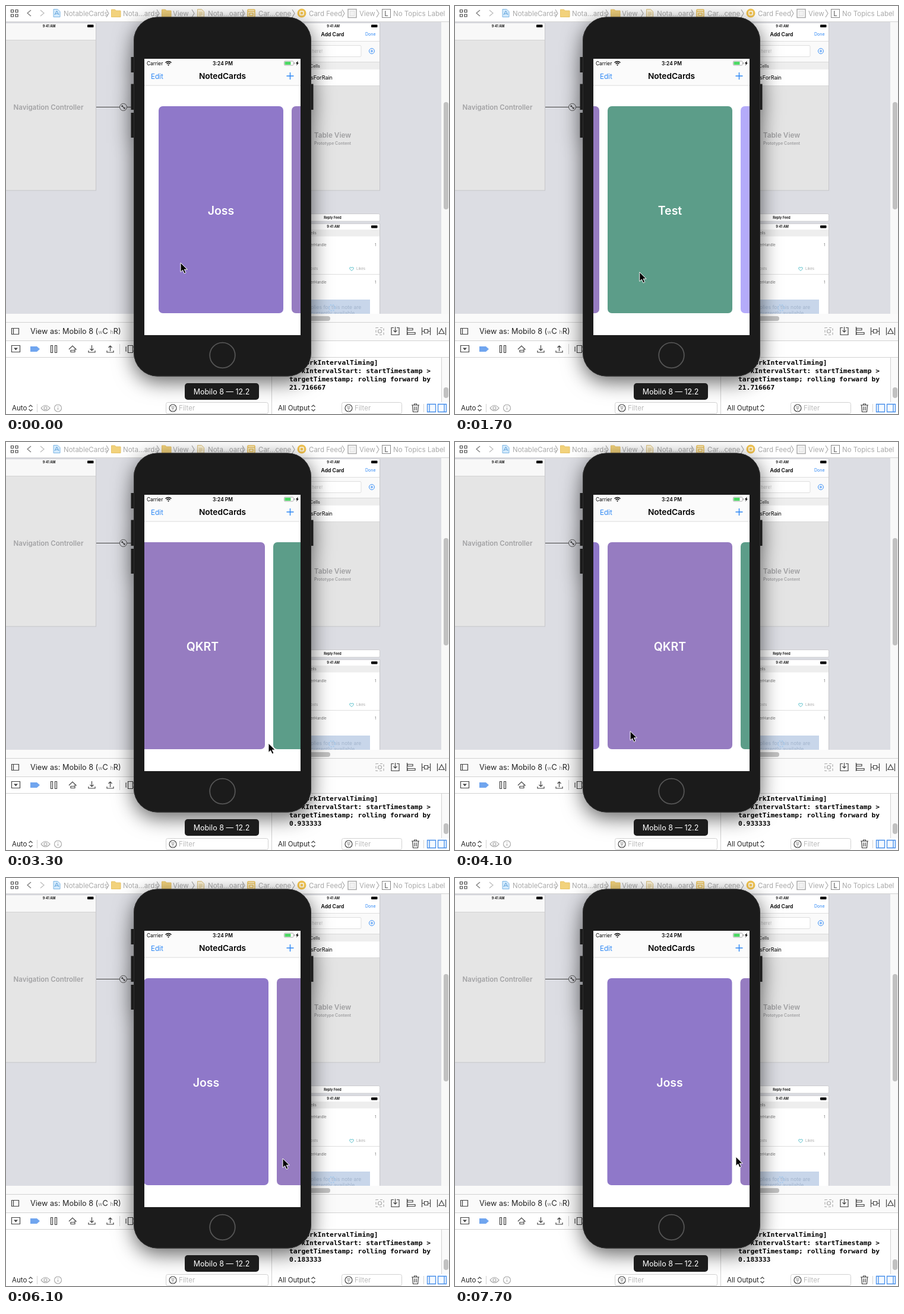
These frames come from a looping animation (746x688 px, 7800 ms). An HTML page:

```html
<!DOCTYPE html>
<html lang="en">
<head>
<meta charset="utf-8">
<title>Card carousel</title>
<style>
html, body { margin: 0; width: 100%; height: 100%; overflow: hidden; background: #fff; }
svg { display: block; font-family: Inter, Roboto, sans-serif; }
text { white-space: pre; }
.b { font-weight: 600; }
.m { text-anchor: middle; }
.line { fill: none; stroke: #444; stroke-width: 1.2; }
.dim { stroke: #aaa; }
.rule { fill: none; stroke: #d2d2d2; }
.tiny { font-size: 5.5px; }
.blue { fill: #2b86f5; }
.log { font: bold 11.3px "DejaVu Sans Mono", "Liberation Mono", monospace; }
.body { filter: drop-shadow(0 9px 17px rgba(0,0,0,.62)); }
</style>
</head>
<body>
<svg width="746" height="688" viewBox="0 0 746 688">
<defs>
  <clipPath id="screen"><rect x="233" y="135" width="263" height="420"/></clipPath>
  <clipPath id="console"><rect x="448" y="594" width="286" height="74"/></clipPath>
  <clipPath id="canvas"><rect y="27" width="733" height="492"/></clipPath>
</defs>
<rect width="746" height="688" fill="#fff"/>

<!-- Storyboard canvas -->
<rect y="27" width="733" height="492" fill="#dcdde3"/>
<rect x="733" y="27" width="13" height="506" fill="#f8f8f8"/>
<rect y="519" width="746" height="14" fill="#fafafa"/>
<rect x="737" y="162" width="8" height="181" rx="4" fill="#c1c1c1"/>
<rect x="300" y="523" width="246" height="8" rx="4" fill="#c1c1c1"/>
<g clip-path="url(#canvas)">
  <rect x="-1" y="29" width="152.500" height="282" fill="#e5e5e5" stroke="#c6c6c9"/>
  <rect y="29" width="151" height="28" fill="#f8f8f8"/>
  <path class="rule" d="M0 57.500H151"/>
  <text class="b m tiny" x="72.500" y="36">9:41 AM</text>
  <rect x="137" y="31.500" width="10.500" height="4.500" rx="1"/>
  <text class="b m" x="71.500" y="175" font-size="11.500" fill="#a3a3a5">Navigation Controller</text>
  <path class="line" d="M152 170.500H212"/>
  <circle cx="197.500" cy="170.500" r="6" fill="#dcdde3" stroke="#555"/>
  <path class="line" d="M195 168l5 5M195 170v-2h2M200 171v2h-2" stroke-width=".8"/>

  <rect x="480" y="29" width="149.500" height="282" fill="#e4e4e4" stroke="#c6c6c9"/>
  <rect x="480" y="29" width="149" height="31" fill="#fff"/>
  <rect x="480" y="60" width="149" height="34" fill="#fafafa"/>
  <rect x="480" y="94" width="149" height="13" fill="#eee"/>
  <rect x="480" y="107" width="149" height="27" fill="#fff"/>
  <path class="rule" d="M480 59.500H629M480 94.500H629M480 134.500H629" stroke-width=".7"/>
  <text class="b m tiny" x="551" y="36">9:41 AM</text>
  <rect x="615" y="31.500" width="10.500" height="4.500" rx="1"/>
  <text class="b m" x="550" y="50.500" font-size="8.600">Add Card</text>
  <text class="blue" x="605" y="50" font-size="7">Done</text>
  <rect x="480" y="66.500" width="118" height="19" rx="2" fill="#fff" stroke="#dedede"/>
  <text x="515" y="79" font-size="7.500" fill="#c4c4c4">here!</text>
  <g fill="none" stroke="#2b86f5" stroke-width=".9"><circle cx="616" cy="76" r="4.500"/><path d="M613.500 76h5M616 73.500v5"/></g>
  <text class="b" x="512" y="103.500" font-size="7" fill="#555">Cells</text>
  <text x="513" y="124" font-size="9">sForRain</text>
  <text class="b m" x="550" y="221.500" font-size="11.800" fill="#a0a0a2">Table View</text>
  <text class="b m" x="550" y="234" font-size="7" fill="#a0a0a2">Prototype Content</text>

  <rect x="480" y="350.500" width="149.500" height="12.500" rx="2" fill="#fff" stroke="#cdcdd0"/>
  <text class="b m tiny" x="550" y="359">Reply Feed</text>
  <rect x="480" y="367" width="149.500" height="160" fill="#fff" stroke="#c6c6c9"/>
  <text class="b m tiny" x="551" y="374">9:41 AM</text>
  <rect x="615" y="370" width="10.500" height="4.500" rx="1"/>
  <rect x="480" y="377" width="149" height="11.500" fill="#eee"/>
  <g font-size="6.200" fill="#777">
    <text x="513" y="385">ells</text>
    <text x="513" y="405">erHandle</text><text x="621" y="405">1</text>
    <text x="513" y="445" fill="#aaa">osts</text><text x="590" y="445" fill="#aaa">Likes</text>
    <text x="513" y="468">erHandle</text><text x="621" y="468">1</text>
  </g>
  <path d="M582 446.500l-3-3q-1-3 1.500-3 1 0 1.500 1.300 .5-1.300 1.500-1.300 2.500 0 1.500 3z" fill="none" stroke="#56bfca"/>
  <path class="rule" d="M480 452.500H629" stroke-width=".7"/>
  <rect x="480" y="495" width="133" height="24" fill="#c8d6ea"/>
  <g font-size="8.600" fill="#a2b4cc"><text x="513" y="510.500">plies for this note are</text><text x="513" y="521">currently available</text></g>
  <circle cx="549" cy="509" r="5" fill="none" stroke="#a9cbed" stroke-width="2" stroke-dasharray="2 2"/>
</g>

<!-- Path bar -->
<path class="rule" d="M0 26.500H746"/>
<g class="line" stroke="#666"><path d="M8.500 6.500h4v4h-4zM16 6.500h4v4h-4zM8.500 14h4v4h-4zM16 14h4v4h-4z"/><path d="M42 7l-6 5 6 5" stroke="#777"/><path d="M58 7l6 5-6 5" stroke="#bbb"/></g>
<g id="crumbs" font-size="11.500" fill="#aaa"></g>
<path d="M80 5.500h7l4 4v9h-11z" fill="#d3eafc" stroke="#7db6e5"/><path d="M82 15l3.500-7 3.500 7M83 13h5" fill="none" stroke="#5c9fd8"/>
<path id="folder" d="M177.500 6h6l1.500 2h8v10.500h-15.500z" fill="#f2d27c" stroke="#e8c365"/><use href="#folder" x="85"/>
<path d="M322.500 5.500h7l4 4v9h-11z" fill="#fcf2d5" stroke="#dcc383"/><path d="M325 11h6M325 13.500h6M325 16h4" stroke="#dcc383"/>
<rect x="407" y="6" width="12" height="12.500" rx="1" fill="#fff6da" stroke="#ebc157" stroke-width="1.500"/><path d="M407 9h12M410 12h6v4h-6z" fill="none" stroke="#ebc157" stroke-width="1.500"/>
<circle cx="498" cy="12" r="7.500" fill="#f2c452"/><rect x="495" y="9" width="6" height="6" rx="1" fill="none" stroke="#fff" stroke-width="1.500"/>
<rect x="576" y="5.500" width="14" height="14" fill="#fff" stroke="#aaa" stroke-width="1.500"/><rect x="579" y="8.500" width="8" height="8" fill="#f2f2f2" stroke="#ddd"/>
<rect x="633.500" y="5.500" width="14" height="14" fill="#fff" stroke="#888"/><text class="m" x="640.500" y="17" font-size="11.500" fill="#555">L</text>

<!-- Device bar -->
<rect y="533" width="746" height="31" fill="#fafafa"/>
<path class="rule" d="M0 533.500H746M0 564.500H746"/>
<path class="line" d="M9.500 543.500h12v10h-12zM12.500 543.500v10"/>
<text x="41" y="552.500" font-size="12.700" fill="#222">View as: Mobilo 8 (<tspan font-size="9" fill="#888">w</tspan>C <tspan font-size="9" fill="#888">h</tspan>R)</text>
<g class="line">
  <path class="dim" d="M623 542.500h13v12h-13z" stroke-dasharray="4 3"/><circle class="dim" cx="629.500" cy="548.500" r="3"/>
  <path d="M653 542.500h-4v12h13v-12h-4M655.500 541v9m-3-3l3 3 3-3"/>
  <path d="M675.500 541v14M676 543.500h9v3h-9zM676 550.500h13v3h-13z"/>
  <path d="M700.500 542v13M714.500 542v13M704.500 545.500h6v6h-6zM701 548.500h3M711 548.500h3"/>
  <path d="M726.500 542v13M740.500 542v13M733.500 544l4.500 8.500h-9z"/>
</g>

<!-- Debug bar -->
<path class="rule" d="M0 592.500H746"/>
<path class="line" d="M9.500 572.500h14v11h-14z"/><path d="M13 576.500h7l-3.500 4z" fill="#444"/>
<path d="M41 574h11l5 4.500-5 4.500h-11z" fill="#70a5ef"/>
<path class="line" d="M75.500 572.500h3v12h-3zM82.500 572.500h3v12h-3z"/>
<g class="line" stroke="#999">
  <path d="M106 579l6-6 6 6h-3M109 583.500h7v-3h-7z"/>
  <path d="M144.500 572v9m-3-3l3 3 3-3M139 581v3h11v-3"/>
  <path d="M175.500 582v-9m-3 3l3-3 3 3M170 581v3h11v-3"/>
</g>
<path class="rule" d="M191.500 570v17"/>
<path class="line" d="M205.500 572.500h8v12h-8zM203 575h-1v7h1M214 575h3v7h-3"/>

<!-- Debug area -->
<path class="rule" d="M447.500 593V688"/>
<rect x="734" y="593" width="12" height="75" fill="#fafafa"/><path class="rule" d="M733.500 593V668"/>
<rect x="737" y="643" width="8" height="18" rx="4" fill="#c1c1c1"/>
<g class="log" clip-path="url(#console)">
  <text x="477" y="605">NetworkIntervalTiming]</text>
  <text x="477" y="619">WorkIntervalStart: startTimestamp &gt;</text>
  <text x="477" y="633">targetTimestamp; rolling forward by</text>
  <text x="477" y="647" id="delay"></text>
</g>
<g font-size="11.500" fill="#222"><text x="10" y="682">Auto</text><text x="458" y="682">All Output</text></g>
<path id="updown" class="line" d="M38.500 676l3-3 3 3M38.500 680l3 3 3-3"/><use href="#updown" x="476"/>
<path class="rule" d="M52.500 671v14M703.500 671v14"/>
<g class="line dim"><path d="M59 678q7.500-9 15 0q-7.500 9-15 0"/><circle cx="66.500" cy="678" r="2.500"/><circle cx="87.500" cy="678" r="6"/><path d="M87.500 677v4M87.500 674v1.500"/></g>
<g id="filter">
  <rect x="269.500" y="668.500" width="172" height="19" rx="3" fill="#fff" stroke="#d2d2d2"/>
  <circle class="line" cx="281" cy="678" r="6" stroke="#777" stroke-width="1"/><path d="M278 676h6M279 678.500h4M280 681h2" stroke="#777"/>
  <text x="291" y="682" font-size="11.500" fill="#bbb">Filter</text>
</g>
<rect x="565.500" y="668.500" width="101" height="19" rx="3" fill="#fff" stroke="#d2d2d2"/>
<circle class="line" cx="577" cy="678" r="6" stroke="#777" stroke-width="1"/><path d="M574 676h6M575 678.500h4M576 681h2" stroke="#777"/>
<text x="587" y="682" font-size="11.500" fill="#bbb">Filter</text>
<path class="line" d="M683 673h13M687.500 673v-2h4v2M684.500 673l1 11.500h8l1-11.500M688 675.500v6.500M691 675.500v6.500" stroke="#555"/>
<g fill="#f4f9ff" stroke="#468eea" stroke-width="1.300"><path d="M709.500 671.500h14v13h-14zM713 671.500v13M727.500 671.500h14v13h-14zM738 671.500v13"/></g>

<!-- Phone -->
<g class="body" fill="#1b1b1b">
  <rect x="215" y="18.500" width="299" height="606" rx="40"/>
  <path d="M210.500 86h6v26h-6zM210.500 131.500h6v43.500h-6zM210.500 180h6v42h-6zM512 131.500h5.500v43.500h-5.500z"/>
</g>
<rect x="215.500" y="19" width="298" height="605" rx="39.500" fill="none" stroke="#303030"/>
<circle cx="364.500" cy="589" r="21.300" fill="none" stroke="#555" stroke-width="1.800"/>
<rect x="233" y="89" width="263" height="466" fill="#fff"/>
<rect x="233" y="89" width="263" height="45" fill="#fbfbfb"/>
<path class="rule" d="M233 134H496" stroke-width=".8"/>
<text x="237" y="99.500" font-size="8.400">Carrier</text>
<g fill="none" stroke="#000" stroke-width="1.400"><path d="M268.500 95.500q5-4 10 0M270.500 97.500q3-2.400 6 0"/></g><path d="M272 99l1.500 1.700 1.500-1.700q-1.500-1-3 0z"/>
<text class="m b" x="365" y="99.500" font-size="8.400">3:24 PM</text>
<rect x="468.500" y="93" width="15.500" height="7" rx="1.500" fill="#fff" stroke="#999" stroke-width=".8"/><rect x="469.500" y="94" width="10" height="5" rx=".6" fill="#4cd964"/><rect x="485" y="95" width="1" height="3" fill="#999"/>
<path d="M491.500 92.500l-3.500 4.500h2l-1 3.500 4-4.700h-2z"/>
<text class="blue" x="244" y="122.500" font-size="11.600">Edit</text>
<text class="m b" x="364.500" y="123" font-size="13.700">NotedCards</text>
<path d="M472.500 118h12M478.500 112v12" stroke="#2b86f5" stroke-width="1.400"/>
<g clip-path="url(#screen)"><g id="cards"></g></g>
<rect x="301" y="636" width="125" height="28" rx="5" fill="#1c1c1c"/>
<text class="m" x="363" y="655" font-size="12.500" fill="#fff">Mobilo 8 — 12.2</text>

<path id="cursor" d="M0 0v15.500l3.600-3.300 2.600 5.800 2.700-1.200-2.600-5.600h5z" stroke="#fff"/>
</svg>
<script>
const $ = id => document.getElementById(id);
const LOOP = 7800, STEP = 100, PITCH = 224;

$('crumbs').innerHTML = [
  [97, 'NotableCards', 169], [197, 'Nota…ards', 254], [281, 'View', 313],
  [340, 'Nota…oard', 398], [425, 'Car…cene', 482], [510, 'Card Feed', 566],
  [595, 'View', 624], [652, 'No Topics Label']
].map(([x, label, arrow]) => `<text x="${x}" y="16.500">${label}</text>` +
  (arrow ? `<path class="line dim" d="M${arrow} 6l4 6.500-4 6.500"/>` : '')).join('');

$('cards').innerHTML = [
  ['Joss', '#8f78c9'], ['QKRT', '#967cc1'], ['Test', '#5c9d89'], ['Loops', '#b4abfa']
].map(([name, color], i) => `<g transform="translate(${257 + i * PITCH} 169)">
  <rect width="210" height="349" rx="7" fill="${color}"/>
  <text class="b m" x="105" y="182.500" font-size="19.500" fill="#fff">${name}</text></g>`).join('');

// Keys: time, value(s)
const scroll = [[0, 0], [300, 0], [500, 150], [750, 224], [850, 224], [1000, 330], [1100, 385],
  [1400, 448], [2100, 448], [2400, 539], [2650, 672], [2850, 672], [3300, 255], [3600, 224],
  [4400, 224], [4700, 70], [4900, 23.5], [5200, 0], [5300, 0], [5500, 130], [5700, 224],
  [5850, 224], [6100, 25], [6400, 2], [6800, 0.5], [7700, 0.5]];
const pointer = [[0, 294, 433], [300, 410, 442], [500, 260, 446], [850, 416, 446], [1000, 310, 446],
  [1100, 255, 447], [2100, 348, 450], [2400, 257, 453], [2850, 262, 480], [3300, 442, 508],
  [4400, 240, 480], [4700, 333, 465], [4900, 333, 465], [5300, 400, 468], [5500, 270, 470],
  [5850, 290, 472], [6100, 466, 473], [6500, 473, 470], [7700, 473, 470]];

function at(keys, t) {
  const i = keys.findIndex(k => k[0] > t);
  if (i < 0) return keys[keys.length - 1].slice(1);
  const a = keys[i - 1], b = keys[i], p = (t - a[0]) / (b[0] - a[0]);
  return a.slice(1).map((v, j) => v + (b[j + 1] - v) * p);
}

function draw(now) {
  const t = Math.floor(now % LOOP / STEP) * STEP;
  $('cards').setAttribute('transform', `translate(${-at(scroll, t)[0]} 0)`);
  $('cursor').setAttribute('transform', `translate(${at(pointer, t)})`);
  $('delay').textContent = t < 2900 ? '21.716667' : t < 4500 ? '0.933333' : '0.183333';
  requestAnimationFrame(draw);
}
draw(performance.now());
</script>
</body>
</html>
```
